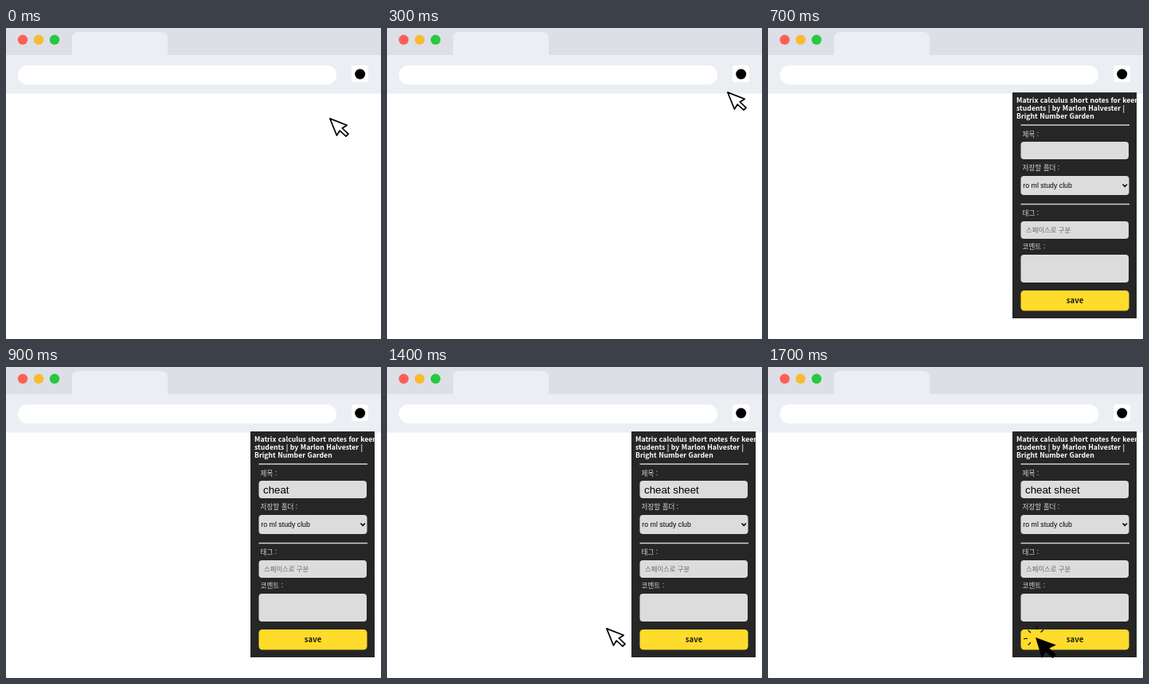
Write an HTML page that moves like this. It is 471 px wide and 391 px high and loops after 2.4 s.

```html
<!DOCTYPE html>
<html lang="ko">
<head>
<meta charset="utf-8">
<title>Save a page</title>
<style>
  html, body { margin: 0; width: 100%; height: 100%; overflow: hidden; background: #fff; }
  svg { display: block; width: 471px; height: 391px; }
  text { font-family: "Noto Sans CJK KR", "Noto Sans CJK", "Noto Sans", sans-serif; }
  .arial { font-family: "Liberation Sans", Arial, sans-serif; }
  .title { font-size: 8.7px; font-weight: 700; fill: #fff; }
  .label { font-size: 8.6px; fill: #d2d2d2; }
  .field { fill: #dcdcdc; }
  .rule { stroke: #d0d0d0; stroke-width: 1.3; }

  .arrow, .click, .panel, .typed tspan { animation: 2400ms step-end infinite; }
  .arrow { animation-name: move, arrow; }
  .click { animation-name: click; }
  .panel { animation-name: panel; }
  .typed .a { animation-name: type-a; }
  .typed .b { animation-name: type-b; }
  .typed .c { animation-name: type-c; }
  .typed .d { animation-name: type-d; }

  @keyframes move {
    0% { transform: translate(406px, 113px); animation-timing-function: steps(5); }
    20.8333% { transform: translate(441px, 58px); }
    50% { transform: translate(235px, 286px); animation-timing-function: steps(2); }
    58.3333% { transform: translate(275px, 328px); animation-timing-function: steps(2); }
    66.6667%, 100% { transform: translate(315px, 358px); }
  }
  @keyframes arrow {
    0%, 50% { opacity: 1; }
    25%, 70.8333%, 100% { opacity: 0; }
  }
  @keyframes click {
    0%, 29.1667% { opacity: 0; transform: translate(336px, 340px); }
    25% { opacity: 1; transform: translate(443px, 61px); }
    70.8333%, 100% { opacity: 1; transform: translate(336px, 340px); }
  }
  @keyframes panel { 0% { opacity: 0; } 29.1667%, 100% { opacity: 1; } }
  @keyframes type-a { 0% { fill-opacity: 0; } 33.3333%, 100% { fill-opacity: 1; } }
  @keyframes type-b { 0% { fill-opacity: 0; } 37.5%, 100% { fill-opacity: 1; } }
  @keyframes type-c { 0% { fill-opacity: 0; } 41.6667%, 100% { fill-opacity: 1; } }
  @keyframes type-d { 0% { fill-opacity: 0; } 45.8333%, 100% { fill-opacity: 1; } }
</style>
</head>
<body>
<svg viewBox="0 0 471 391">
  <!-- browser window -->
  <rect width="471" height="391" fill="#fff"/>
  <rect width="471" height="34.5" fill="#dddfe6"/>
  <rect y="34.5" width="471" height="48" fill="#ebeff4"/>
  <path d="M83 35V13q0-8 8-8H195q8 0 8 8V35z" fill="#ebeff4"/>
  <circle cx="21" cy="14.8" r="6.2" fill="#ff5f57"/>
  <circle cx="41" cy="14.8" r="6.2" fill="#f8bb2f"/>
  <circle cx="61" cy="14.8" r="6.2" fill="#28c840"/>
  <rect x="15" y="47" width="400" height="24" rx="12" fill="#fff"/>
  <rect x="434" y="47" width="21" height="21" rx="3" fill="#fff"/>
  <circle cx="444.7" cy="58" r="6.5"/>
  <path d="M0 389.5V391H1.5zM471 389.5V391H469.5z" fill="#d5d5d5"/>

  <g class="panel">
    <rect x="307" y="81" width="156" height="284" fill="#262626"/>
    <g class="title">
      <text x="312" y="94">Matrix calculus short notes for keen</text>
      <text x="312" y="104">students | by Marlon Halvester |</text>
      <text x="312" y="114">Bright Number Garden</text>
    </g>
    <path class="rule" d="M317.5 122H454M317.5 221.5H454"/>
    <g class="label">
      <text x="319.5" y="136.5">제목 :</text>
      <text x="319.5" y="179">저장할 폴더 :</text>
      <text x="319.5" y="236">태그 :</text>
      <text x="319.5" y="278">코멘트 :</text>
    </g>
    <g class="field">
      <rect x="317.5" y="143" width="135.5" height="22" rx="4"/>
      <rect x="317.5" y="186" width="136" height="24" rx="4"/>
      <rect x="317.5" y="243" width="135.5" height="22" rx="4"/>
      <rect x="317.5" y="285" width="135.5" height="35" rx="4"/>
    </g>
    <text class="arial typed" x="323" y="158.5" font-size="13.3"><tspan class="a">ch</tspan><tspan class="b">eat</tspan><tspan class="c"> sh</tspan><tspan class="d">eet</tspan></text>
    <text class="arial" x="320.3" y="201" font-size="8.8">ro ml study club</text>
    <path d="M445.5 196.5l2.7 2.8 2.7-2.8" fill="none" stroke="#000" stroke-width="1.5"/>
    <text x="324" y="257" font-size="8.4" fill="#6c6c6c">스페이스로 구분</text>
    <rect x="317.5" y="330" width="136" height="25.5" rx="4.5" fill="#ffdc2b"/>
    <text x="385.5" y="346" font-size="9.6" font-weight="700" fill="#1c1a10" text-anchor="middle">save</text>
  </g>

  <path class="arrow" d="M.9.9 22.2 9.2 16.3 13 24 20.2 21 23.2 13.2 16 9.4 22z"
        fill="#fff" stroke="#000" stroke-width="1.7" stroke-linejoin="round"/>
  <g class="click">
    <path d="M0 0 26 9.5 17.5 13.5 26 22 21.5 26.3 12.8 18 8 26z"/>
    <path d="M-9.5-9.2-6-6M1.7-15 1.3-10M9.8-9.5 6.5-6.5M-15 1.7-10 1.2M-9.3 9.5-6 6.3" stroke="#000" stroke-width="1.1"/>
  </g>
</svg>
</body>
</html>
```
